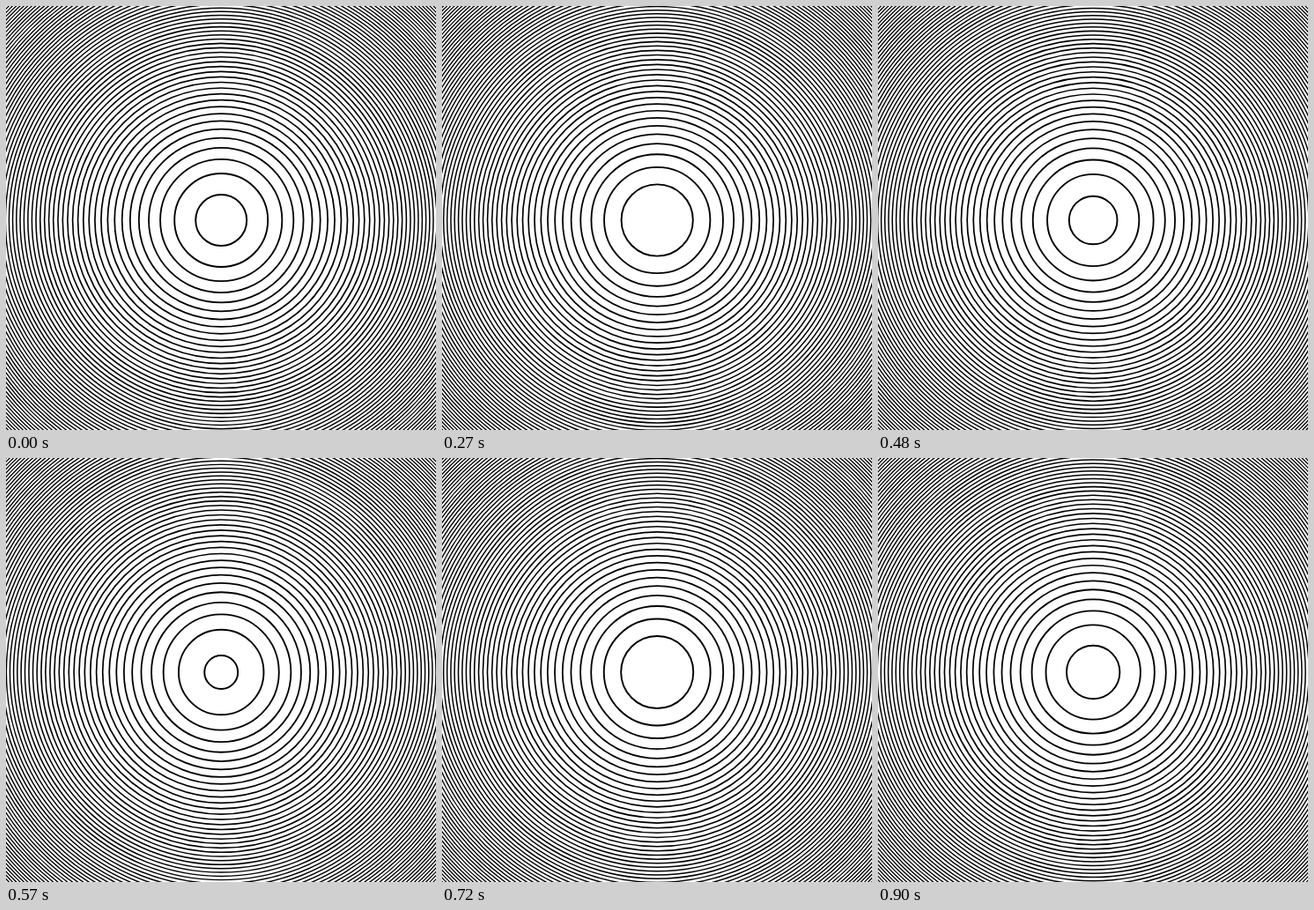
Write an HTML page with a canvas that moves like this. It is 488 by 481 pixels and loops after 930 ms.

```html
<!DOCTYPE html>
<html lang="en">
<head>
<meta charset="utf-8">
<title>Contracting rings</title>
<style>
  html, body { margin: 0; width: 100%; height: 100%; overflow: hidden; background: #fff; }
  canvas { display: block; }
</style>
</head>
<body>
<canvas id="stage" width="488" height="481"></canvas>
<script>
  const ctx = document.getElementById('stage').getContext('2d');
  const CX = 244.2, CY = 243;
  const LOOP = 930, TICK = 30;
  const GAP = 1970;     // difference of squared radii between neighbouring rings
  const START = 841;    // squared radius of the first ring at time zero
  const SHRINK = 129;   // loss of squared radius per tick
  const REACH = 345;

  function draw(step) {
    ctx.fillStyle = '#fff';
    ctx.fillRect(0, 0, 488, 481);
    ctx.strokeStyle = '#000';
    const offset = START - SHRINK * step;
    const first = ((offset % GAP) + GAP) % GAP;
    for (let sq = first; sq < REACH * REACH; sq += GAP) {
      const r = Math.sqrt(sq);
      ctx.lineWidth = 2 - 0.75 * r / REACH;   // finer towards the corners
      ctx.beginPath();
      ctx.arc(CX, CY, r, 0, 2 * Math.PI);
      ctx.stroke();
    }
  }

  let shown = -1;
  const begin = performance.now();

  function tick() {
    const step = Math.floor(((performance.now() - begin) % LOOP) / TICK);
    if (step !== shown) draw(shown = step);
    requestAnimationFrame(tick);
  }
  tick();
</script>
</body>
</html>
```
